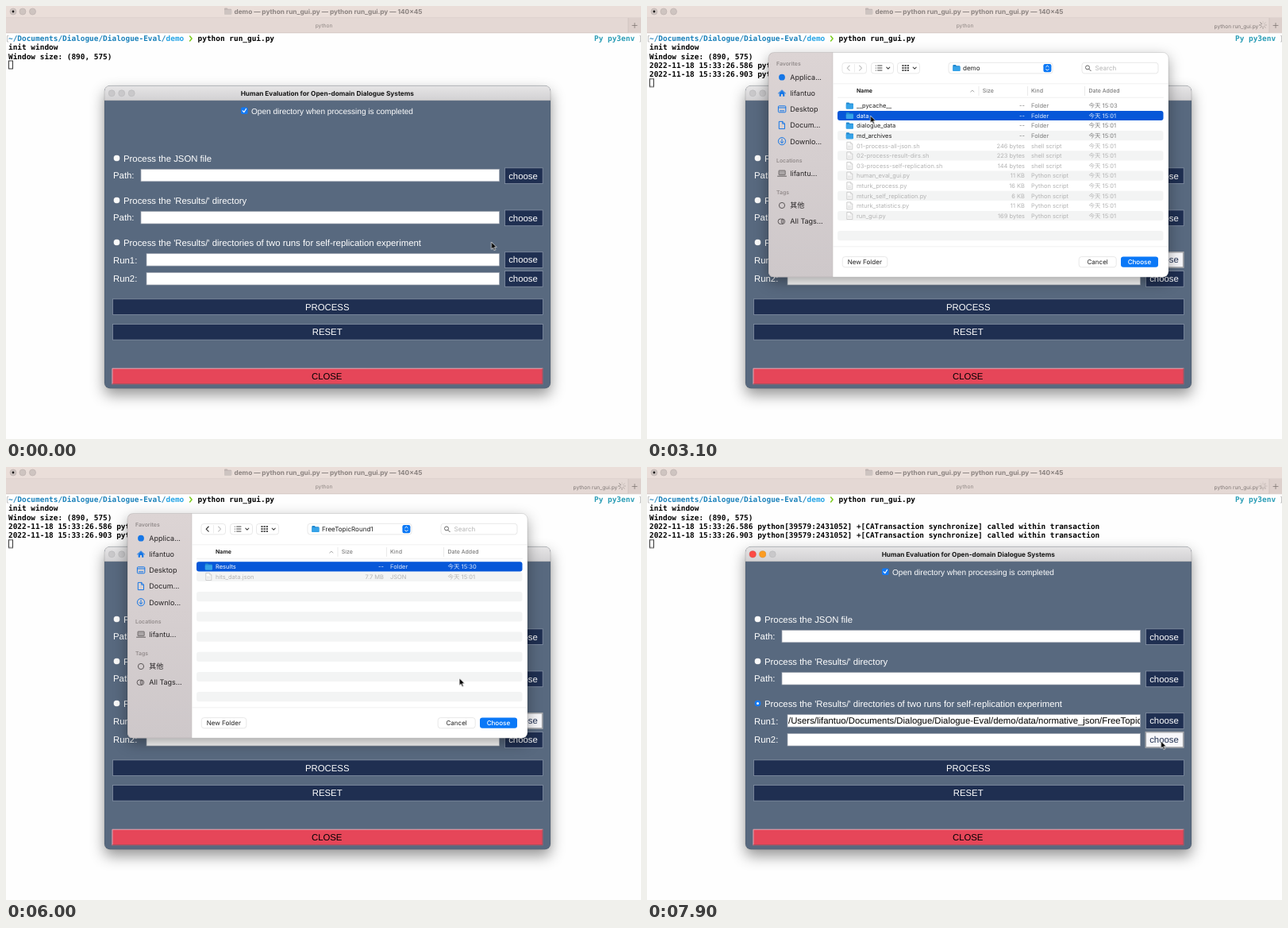
Write an HTML page that moves like this. It is 800 px wide and 545 px high and loops after 8 s.

```html
<!DOCTYPE html>
<html lang="en">
<head>
<meta charset="utf-8">
<title>Dialogue evaluation demo</title>
<style>
html, body { margin: 0; width: 100%; height: 100%; overflow: hidden; background: #fefefe; }
svg { display: block; width: 800px; height: 545px; }
text { white-space: pre; text-rendering: geometricPrecision; font-family: Inter, "Noto Sans CJK SC", "Noto Sans CJK", sans-serif; }
.mid { text-anchor: middle; }
.end { text-anchor: end; }
.term { font: bold 9.435px "DejaVu Sans Mono", monospace; }
.bar { font-size: 8.25px; font-weight: 700; }
.tab { font-size: 6.6px; fill: #7f7775; }
.form { font: 11.36px "Liberation Sans", Arial, sans-serif; fill: #fff; }
.note { font: 10.08px "Liberation Sans", Arial, sans-serif; fill: #fff; }
.dark { fill: #000; }
.cell { font-size: 7.5px; }
.head { font-size: 7px; fill: #666; }
.side { font-size: 9px; fill: #242122; }
.group { font-size: 6.9px; font-weight: 600; fill: #928b8b; }
.ctl { font-size: 8.05px; fill: #222; }
.line { fill: none; stroke-width: 1; stroke-linecap: round; stroke-linejoin: round; }
.window { filter: drop-shadow(0 8px 9px rgba(0,0,0,.42)); }
.sheet { filter: drop-shadow(0 6px 9px rgba(0,0,0,.36)); }
.block { animation: block 8s step-end infinite; }
.pointer { animation: pointer 8s ease-in-out infinite; }
.spin { transform-origin: 776px 24px; animation: spin 1s steps(8) infinite; }
@keyframes block {
  0% { transform: translateY(0); }
  18.75% { transform: translateY(11.3px); }
  22.5%, 100% { transform: translateY(22.6px); }
}
@keyframes spin { to { transform: rotate(360deg); } }
@keyframes pointer {
  0%, 1% { transform: translate(611.5px, 297px); }
  10%, 25% { transform: translate(652px, 317px); }
  34%, 42.5% { transform: translate(281.5px, 138px); }
  48%, 56% { transform: translate(292px, 126px); }
  61% { transform: translate(304.5px, 126px); }
  70% { transform: translate(304.5px, 126px); animation-timing-function: ease-in; }
  75% { transform: translate(571px, 265.5px); animation-timing-function: ease-out; }
  79%, 82.5% { transform: translate(614px, 320px); }
  85%, 91% { transform: translate(605.5px, 317px); }
  97.5%, 100% { transform: translate(647.5px, 345px); }
}
</style>
</head>
<body>
<svg id="stage" viewBox="0 0 800 545"></svg>
<script>
const LOOP = 8000;

// Markup helpers
const text = (x, y, s, cls, fill) =>
  `<text x="${x}" y="${y}" class="${cls}"${fill ? ` style="fill:${fill}"` : ''}>${s}</text>`;
const box = (x, y, w, h, fill, r = 0, extra = '') =>
  `<rect x="${x}" y="${y}" width="${w}" height="${h}" rx="${r}" fill="${fill}" ${extra}/>`;
const dot = (x, y, r, fill, extra = '') => `<circle cx="${x}" cy="${y}" r="${r}" fill="${fill}" ${extra}/>`;
const line = (d, color, width = 1) => `<path class="line" d="${d}" stroke="${color}" style="stroke-width:${width}"/>`;
// Shows its content only inside the given from/to pairs (ms)
const during = (spans, body) => `<g data-on="${spans}">${body}</g>`;

const folder = (x, y, main = '#36a3e8', top = '#2189d0') =>
  `<path d="M${x} ${y + 1}q0-1 1-1h2.6l1 1.2h3.6q1 0 1 1v4.8q0 1-1 1h-7.2q-1 0-1-1z" fill="${top}"/>` +
  box(x, y + 2.2, 9.2, 5.8, main, .9);
const page = (x, y) =>
  `<path d="M${x} ${y}h4.6l2.4 2.4v6.6h-7z" fill="#fafafa" stroke="#bcbcbc" stroke-width=".7"/>` +
  line(`M${x + 4.6} ${y}v2.4h2.4M${x + 1.6} ${y + 5}h3.6m-3.6 1.8h3.6`, '#c8c8c8', .6);

// Terminal
const PROMPT = 43.9, PITCH = 11.3;
const out = (row, s) => text(3, PROMPT + row * PITCH, s, 'term', '#000');
const log = ms => `2022-11-18 15:33:26.${ms} python[39579:2431052] +[CATransaction synchronize] called within transaction`;

function spinner() {
  let s = '';
  for (let i = 0; i < 8; i++)
    s += `<path d="M776 21.8v-2.4" transform="rotate(${i * 45} 776 24)" stroke="#6f6765" stroke-width=".9" stroke-linecap="round" opacity="${.15 + i * .1}"/>`;
  return `<g class="spin">${s}</g>`;
}

const terminal = () =>
  box(0, 0, 800, 545, '#fefefe') +
  box(0, 0, 800, 15, '#eaded9') +
  box(0, 15, 800, 19, '#e4d8d4') +
  box(0, 14.5, 800, .6, '#d8ccc8') + box(0, 33.5, 800, .7, '#cfc3bf') +
  box(784, 15, 16, 19, '#ddd0cc') + box(783.6, 15, .7, 19, '#c9bdb9') +
  line('M789 24.5h6m-3-3v6', '#807875', .8) +
  [9, 21, 33.5].map(x => dot(x, 7, 4, '#cec4c0', 'stroke="#b9aeab" stroke-width=".6"')).join('') +
  dot(9, 7, 1.4, '#1c1a1a') +
  folder(275, 2.6, '#cdc4c1', '#bfb5b2') +
  text(406, 10, 'demo — python run_gui.py — python run_gui.py — 140×45', 'bar mid', '#8b8380') +
  text(400.5, 26.6, 'python', 'tab mid', '#8f8784') +
  during('1900 8000', text(714.5, 27.6, 'python run_gui.py', 'tab') + spinner()) +
  line('M3 37.5H1.5V45H3', '#aaa', .7) + line('M798.6 37.5h.9V45h-.9', '#aaa', .7) +
  out(0, '<tspan fill="#1c82bb">~/Documents/Dialogue/Dialogue-Eval/</tspan><tspan fill="#25a5e6">demo</tspan>') +
  line('M231.6 38l2.5 3-2.5 3', '#7ccb1d', 1.5) +
  text(241.6, PROMPT, 'python run_gui.py', 'term', '#000') +
  text(741, PROMPT, 'Py py3env', 'term', '#2a9db6') +
  out(1, 'init window') + out(2, 'Window size: (890, 575)') +
  during('1500 8000', out(3, log(586))) +
  during('1800 8000', out(4, log(903))) +
  `<g class="block">${box(3.5, 69, 5, 10, 'none', 0, 'stroke="#222" stroke-width=".9"')}</g>`;

// Form window
const radio = (y, on) => dot(139.5, y, 4.1, on ? '#1479f2' : '#fafafa', 'stroke="#4a5a70" stroke-width=".5"') +
  (on ? dot(139.5, y, 1.5, '#fff') : '');
const entry = (x, y) => box(x, y - 7.6, 621.5 - x, 15.4, '#fff', 0, 'stroke="#9aa1ad" stroke-width=".7"');
const button = (x, y, w, label, fill = '#1f2f51', color = '#fff') =>
  box(x + .4, y - 9.9, w - .8, 19.8, fill, 0, 'stroke="#8592a5" stroke-width=".8"') +
  text(x + w / 2 - .8, y + 3.8, label, 'form mid', color);
const choose = y => button(628, y, 48.6, 'choose');
const chooseHot = y =>
  box(628.3, y - 9.6, 47.4, 19.2, '#f7f7fa', 0, 'stroke="#a2a4a8" stroke-width="1.6"') +
  text(651.5, y + 3.8, 'choose', 'form mid', '#1f2f51');
const label = (x, y, s) => text(x, y + 4, s, 'form');

const form = () =>
  box(124, 100.3, 562, 381, '#58697f', 7, 'class="window"') +
  '<path d="M124 119v-11.7q0-7 7-7h548q7 0 7 7V119z" fill="url(#title)"/>' +
  box(124, 118.4, 562, .7, '#b4b3b5') +
  box(124, 100.3, 562, 381, 'none', 7, 'stroke="#000" stroke-opacity=".22" stroke-width=".6"') +
  [133.2, 145.7, 158.2].map(x => dot(x, 109.8, 4, '#c9c8ca', 'stroke="#b3b2b4" stroke-width=".5"')).join('') +
  during('0 2000 7000 8000',
    dot(133.2, 109.8, 4.1, '#fc4b45', 'stroke="#d8362f" stroke-width=".4"') +
    dot(145.7, 109.8, 4.1, '#fc9c22', 'stroke="#d68014" stroke-width=".4"')) +
  text(404.8, 112.6, 'Human Evaluation for Open-domain Dialogue Systems', 'bar mid', '#161616') +
  box(296, 127.4, 8.6, 8.6, '#1479f2', 1.8) + line('M298.2 131.8l1.6 1.9 2.7-4.2', '#fff', 1.2) +
  text(309, 135.6, 'Open directory when processing is completed', 'note') +
  radio(191.5, false) + label(148, 191.5, 'Process the JSON file') +
  label(135, 213.3, 'Path:') + entry(170, 213) + choose(213.7) +
  during('0 600 900 1500 1800 2000', box(170.4, 206.4, .9, 13.6, '#000')) +
  radio(244.5, false) + during('0 7000', radio(244.5, true)) + label(148, 244.5, "Process the 'Results/' directory") +
  label(135, 266.4, 'Path:') + entry(170, 266.2) + choose(266.8) +
  radio(297.5, false) + during('7000 8000', radio(297.5, true)) +
  label(148, 297.5, "Process the 'Results/' directories of two runs for self-replication experiment") +
  label(135, 319.5, 'Run1:') + entry(177, 319.3) + choose(319.6) +
  during('560 7000', chooseHot(319.4)) +
  during('7000 8000', '<g clip-path="url(#run)">' +
    text(178, 323.4, '/Users/lifantuo/Documents/Dialogue/Dialogue-Eval/demo/data/normative_json/FreeTopicRound1/Results', 'form', '#000') + '</g>') +
  label(135, 343.4, 'Run2:') + entry(177, 343.2) + choose(343.4) +
  during('7600 8000', chooseHot(343.3)) +
  button(134, 378.7, 543, 'PROCESS') + button(134, 410.3, 543, 'RESET') +
  button(133.5, 466, 543, 'CLOSE', '#e64659', '#000') +
  line('M134 475.8V456.3H676', '#f39aa4', .9) + line('M134 475.8H676V456.5', '#a93d4b', .9);

// File dialog
const rowY = k => 125.4 + k * 12.6;
const bar = (k, fill) => box(240, rowY(k) - 6.1, 410.5, 12.2, fill, 3);

function fileRow(entry, k, on) {
  const [name, size, kind, time] = entry.split('|');
  const isDir = kind === 'Folder', y = rowY(k) + 2.7;
  const main = on ? '#fff' : isDir ? '#222' : '#b3b3b3';
  const soft = on ? '#e2ebfb' : isDir ? '#7c7c7c' : '#b3b3b3';
  return (on ? bar(k, '#0757d8') : '') +
    (isDir ? folder(250.8, rowY(k) - 4) : page(251.8, rowY(k) - 4.5)) +
    text(264, y, name, 'cell', main) + text(476, y, size, 'cell end', soft) +
    text(484, y, kind, 'cell', soft) + text(556.5, y, '今天 ' + time, 'cell', soft);
}

// One directory view: when it shows, its rows, and the row that gets selected
function view({ span, name, rows, pick, pickSpan, back }) {
  return during(span,
    text(398, 81, name, 'ctl') + line('M255.2 75l-3 3.1 3 3.1', back ? '#333' : '#c2c2c2', 1.1) +
    rows.map((r, k) => fileRow(r, k, false)).join('') +
    during(pickSpan, fileRow(rows[pick], pick, true)));
}

const dir = (name, time = '15:01') => `${name}|--|Folder|${time}`;
const file = (name, size, kind) => `${name}|${size}|${kind}|15:01`;
const sh = (name, size) => file(name + '.sh', size + ' bytes', 'shell script');
const py = (name, size) => file(name + '.py', size, 'Python script');

const views = [
  { span: '2000 3400', name: 'demo', pick: 1, pickSpan: '2800 3400', rows: [
    dir('__pycache__', '15:03'), dir('data'), dir('dialogue_data'), dir('md_archives'),
    sh('01-process-all-json', 246), sh('02-process-result-dirs', 223), sh('03-process-self-replication', 144),
    py('human_eval_gui', '11 KB'), py('mturk_process', '16 KB'), py('mturk_self_replication', '6 KB'),
    py('mturk_statistics', '11 KB'), py('run_gui', '169 bytes')] },
  { span: '3400 4400', name: 'data', pick: 0, pickSpan: '4100 4400', back: true, rows: [dir('normative_json')] },
  { span: '4400 5440', name: 'normative_json', pick: 0, pickSpan: '5160 5440', back: true,
    rows: [dir('FreeTopicRound1'), dir('FreeTopicRound2'), dir('IceBreaker')] },
  { span: '5440 6600', name: 'FreeTopicRound1', pick: 0, pickSpan: '5680 6600', back: true,
    rows: [dir('Results', '15:30'), file('hits_data.json', '7.7 MB', 'JSON')] }
];

const BLUE = '#1576e6';
const sideIcons = () =>
  dot(170, 89.7, 3.9, BLUE) +
  line('M165.4 110l4.6-4.2 4.6 4.2', BLUE) + `<path d="M166.7 109.6l3.3-3 3.3 3v4.2h-2.2v-2.8h-2.2v2.8h-2.2z" fill="${BLUE}"/>` +
  box(165.4, 125.8, 9.4, 8, 'none', 1, `stroke="${BLUE}"`) + line('M165.5 128h9.2m-7.2 3.8h5.2', BLUE) +
  line('M166.7 145.4h4l2.8 2.8v6.4h-6.8zM170.7 145.4v2.8h2.8', BLUE) +
  dot(170, 170.2, 4.6, 'none', `stroke="${BLUE}"`) + line('M170 167.7v4.8m-2-1.9l2 2 2-2', BLUE) +
  box(166, 207, 8.2, 5.6, '#aaa5a6', .6, 'stroke="#625d5e" stroke-width=".8"') + line('M164.6 214.2h11', '#625d5e') +
  dot(170, 251, 3.6, 'none', 'stroke="#4f4a4b" stroke-width=".9"') +
  dot(168.4, 271.2, 3.3, 'none', 'stroke="#4f4a4b" stroke-width=".9"') +
  line('M170.4 267.9a3.3 3.3 0 1 1 0 6.6', '#4f4a4b', .9) + line('M169.4 269.5v3.4', '#4f4a4b', .8);

const sideText = () =>
  [['Favorites', 75.4], ['Locations', 196.8], ['Tags', 237.3]].map(([s, y]) => text(163, y, s, 'group')).join('') +
  [['Applica...', 89.9], ['lifantuo', 110], ['Desktop', 130.1], ['Docum...', 150.2], ['Downlo...', 170.4],
    ['lifantu...', 210.8], ['其他', 251], ['All Tags...', 271.2]]
    .map(([s, y]) => text(180.3, y + 3.2, s, 'side')).join('');

const field = (x, y, w, h, fill = '#fff') => box(x, y, w, h, fill, 3.2, 'stroke="#dedede" stroke-width=".7"');
const chevron = x => line(`M${x - 2} 77.2l2 2 2-2`, '#444', 1.1);

function toolbar() {
  let grid = '';
  for (let i = 0; i < 9; i++) grid += box(321.3 + i % 3 * 3.2, 73.9 + Math.floor(i / 3) * 3, 2.3, 2.1, '#555', .4);
  return field(246, 71.5, 30.5, 13.4) + box(261.2, 73, .6, 10.4, '#e2e2e2') +
    line('M267.6 75l3 3.1-3 3.1', '#c2c2c2', 1.1) +
    field(282.5, 71.5, 28, 13.4) + line('M290.6 75h5.4m-5.4 3h5.4m-5.4 3h5.4', '#444') +
    [75, 78, 81].map(y => dot(288.4, y, .6, '#444')).join('') + chevron(303.8) +
    field(315.5, 71.5, 28, 13.4) + grid + chevron(337.2) +
    field(380, 71.3, 131, 13.6) + folder(385.3, 74) +
    box(499.4, 73, 10, 10.2, '#0a78f5', 2.2) + line('M502.6 76.8l1.8-1.8 1.8 1.8m-3.6 2.6l1.8 1.8 1.8-1.8', '#fff', 1) +
    field(548, 71.3, 96, 13.6) + dot(555, 77.4, 2.5, 'none', 'stroke="#555" stroke-width=".9"') +
    line('M556.9 79.4l2.3 2.3', '#555') + text(564.6, 81, 'Search', 'ctl', '#b4b4b4');
}

const columns = () =>
  box(234, 97.6, 423, .6, '#e6e6e6') + box(240, 114.8, 411, .6, '#e4e4e4') +
  [417.7, 479, 551.3].map(x => box(x, 101, .6, 12, '#dcdcdc')).join('') +
  text(264, 109.2, 'Name', 'head', '#222;font-weight:700') + line('M407.8 108l2-2 2 2', '#888', .8) +
  text(422.8, 109.2, 'Size', 'head') + text(484, 109.2, 'Kind', 'head') + text(556.5, 109.2, 'Date Added', 'head');

const footer = () =>
  box(234, 302.6, 423, .6, '#e6e6e6') +
  field(246.3, 315.6, 56.5, 13.2) + text(274.3, 325, 'New Folder', 'ctl mid') +
  field(544.2, 315.6, 47, 13.2) + text(567.6, 325, 'Cancel', 'ctl mid') +
  box(597, 315.4, 47, 13.4, '#0a78f7', 3.2) + text(620.4, 325, 'Choose', 'ctl mid', '#fff;font-weight:500');

function dialog() {
  let stripes = '';
  for (let k = 1; k < 14; k += 2) stripes += bar(k, '#f3f4f4');
  return during('2000 6600',
    box(153, 58.5, 504, 282.7, '#fff', 7, 'class="sheet"') +
    '<path d="M234 58.5V341.2H160q-7 0-7-7V65.5q0-7 7-7z" fill="url(#side)"/>' +
    box(233.6, 58.5, .7, 282.7, '#c9c3c3') +
    box(153, 58.5, 504, 282.7, 'none', 7, 'stroke="#000" stroke-opacity=".2" stroke-width=".6"') +
    sideIcons() + sideText() + toolbar() + columns() + stripes + views.map(view).join('') + footer());
}

const gradient = (id, a, b) =>
  `<linearGradient id="${id}" x2="0" y2="1"><stop stop-color="${a}"/><stop offset="1" stop-color="${b}"/></linearGradient>`;

const stage = document.getElementById('stage');
stage.innerHTML =
  `<defs>${gradient('title', '#e6e5e6', '#d2d1d3')}${gradient('side', '#dcd4d4', '#cec8ca')}` +
  '<clipPath id="run"><rect x="177.5" y="311" width="443.5" height="17"/></clipPath></defs>' +
  terminal() + form() + dialog() +
  '<g class="pointer"><path d="M0 0V9.3L2.1 7.3 3.6 10.7 5.2 10 3.7 6.7H6.6Z" fill="#000" stroke="#fff" stroke-width=".7"/></g>';

for (const el of stage.querySelectorAll('[data-on]')) {
  const times = el.dataset.on.split(' ').map(Number);
  const steps = [[0, 0], ...times.map((t, i) => [t, 1 - i % 2]), [LOOP, 0]];
  el.animate(steps.map(([t, opacity]) => ({ offset: t / LOOP, opacity, easing: 'step-end' })),
    { duration: LOOP, iterations: Infinity });
}
</script>
</body>
</html>
```
